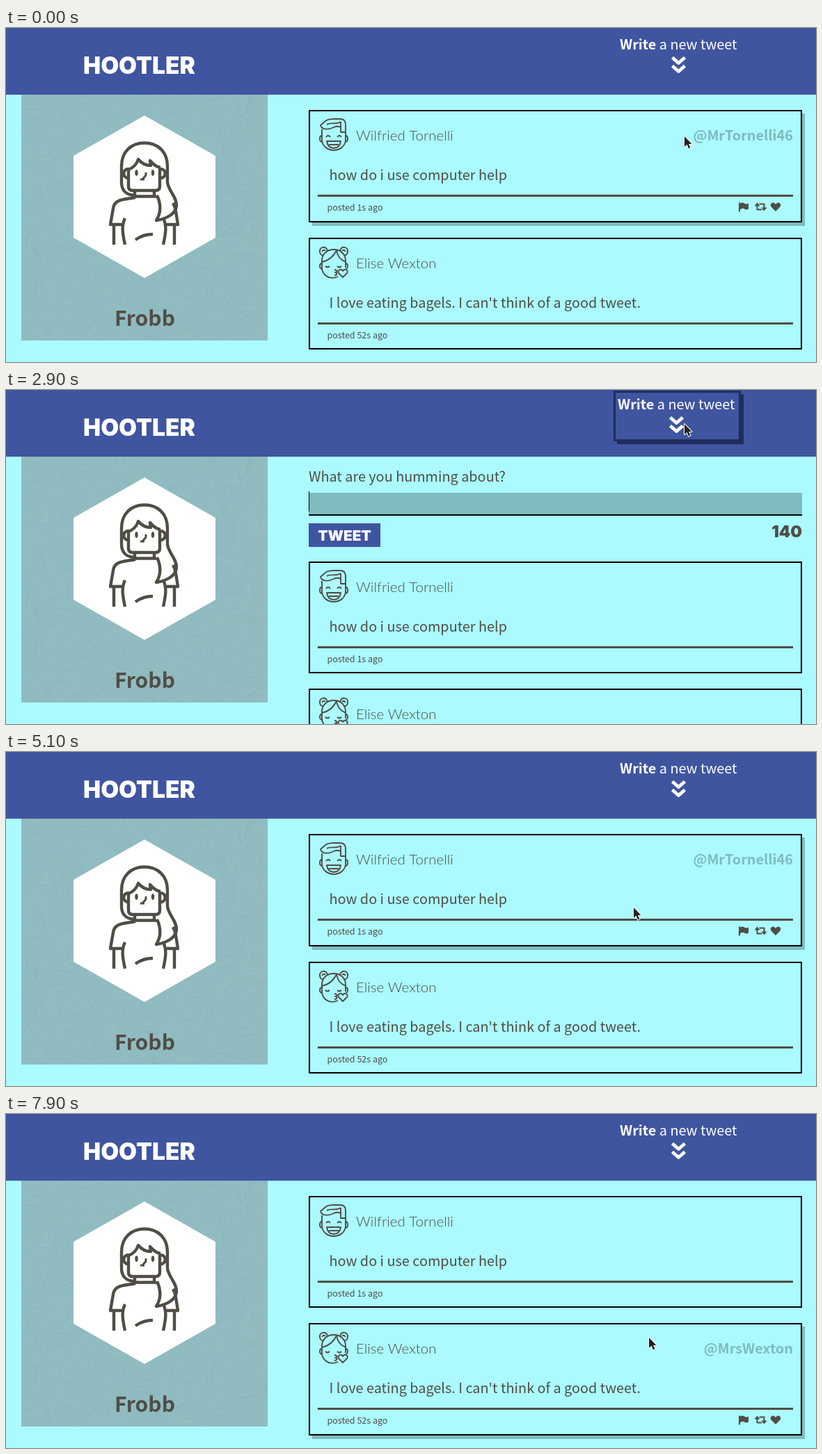
These frames come from a looping animation (1164x481 px, 8 s). An HTML page with a canvas:

```html
<!DOCTYPE html>
<html lang="en">
<head>
<meta charset="utf-8">
<title>Hootler</title>
<style>
html, body { margin: 0; width: 100%; height: 100%; overflow: hidden; background: #aafaff; }
canvas { display: block; }
</style>
</head>
<body>
<canvas id="stage" width="1164" height="481"></canvas>
<script>
const ctx = document.getElementById('stage').getContext('2d');
const LOOP = 8000;
const SANS = '"Noto Sans CJK JP", "Noto Sans CJK SC", "Noto Sans CJK", "Noto Sans", sans-serif';
const LIGHT = 'Lato, "Open Sans", sans-serif';
const CHUNKY = 'Inter, Roboto, sans-serif';
const BODY = 19.85;
const C = { page: '#aafaff', header: '#4055a0', ink: '#504d45', teal: '#7fbbbf', dark: '#1f2d5c' };
const FORM_HEIGHT = 136;
const FORM_TOP = 96;

const posts = [
  { id: 'first', name: 'Wilfried Tornelli', handle: '@MrTornelli46', text: 'how do i use computer help', age: '1s' },
  { id: 'second', name: 'Elise Wexton', handle: '@MrsWexton', text: "I love eating bagels. I can't think of a good tweet.", age: '52s' }
];

// [time, x, y, glide from the previous key]
const cursorKeys = [
  [0, 975, 156], [500, 975, 156], [1400, 975, 49, true], [4500, 975, 51],
  [4700, 902, 225], [5100, 902, 224], [5200, 902, 225], [6100, 903, 250],
  [6500, 890, 364], [6800, 890, 364], [7400, 908, 190, true], [7600, 908, 190], [7900, 924, 322, true]
];
const hoverKeys = [
  [0, 'first'], [900, ''], [1200, 'write'], [4500, 'first'],
  [6100, 'second'], [7100, 'first'], [7800, 'second']
];

const swing = u => 0.5 - Math.cos(Math.PI * Math.min(1, Math.max(0, u))) / 2;

function rect(x, y, w, h, color) {
  ctx.fillStyle = color;
  ctx.fillRect(x, y, w, h);
}

function text(str, x, y, size, { weight = 400, color = C.ink, align = 'left', family = SANS } = {}) {
  ctx.font = `${weight} ${size}px ${family}`;
  ctx.fillStyle = color;
  ctx.textAlign = align;
  ctx.fillText(str, x, y);
  return ctx.measureText(str).width;
}

function outline(path, width, x = 0, y = 0, color = C.ink) {
  ctx.save();
  ctx.translate(x, y);
  ctx.strokeStyle = color;
  ctx.lineWidth = width;
  ctx.lineJoin = 'round';
  ctx.stroke(path);
  ctx.restore();
}

function solid(path, x, y, color = C.ink) {
  ctx.save();
  ctx.translate(x, y);
  ctx.fillStyle = color;
  ctx.fill(path);
  ctx.restore();
}

const shapes = {
  hexagon: new Path2D('M199 126 301 184V302L199 360 97 302V184Z'),
  woman: new Path2D(`M186 241C173 241 166 234 166 222V199C166 178 180 165.5 199 165.5S232 178 232 199V222
    C233 234 246 244 245 256C244 268 230 275 216 277C223 266 223 254 217 241
    M176 201V228Q176 234 182 234H215Q221 234 221 228V201
    M176 204C183 201 188 196 190 189C195 195 202 198 208 198L207 191C212 197 217 200 222 201
    M176 203C167 203 167 216 176 216M222 203C231 203 231 216 222 216
    M185 234V241M213 234V241M184 242.5H216M186 244C176 246 165 246 160 250Q155 253 154 260L150 283H166
    M171 274C166 284 167 294 171 312M155 283V312M240 252Q243 257 244 264L247 283H231
    M226 274C231 284 230 294 226 312M242 283V312M186 305C193 300 201 297 211 297`),
  womanEyes: new Path2D('M187.5 204C190.5 204 190.5 213 187.5 213S184.5 204 187.5 204ZM211 204C214 204 214 213 211 213S208 204 211 204Z'),
  womanNose: new Path2D('M201 208V212L196 218M193 218H199'),
  first: new Path2D(`M-17 -8V8C-16 17 -8 22 0 22S16 17 17 8V-15C17 -20 14 -23 9 -23H0
    C-12 -23 -12 -19 -19 -14C-17 -6 -6 -8 0 -11C4 -13 8 -12 10 -11V-4H17M10 -11V-19
    M-10 -15C-5 -19 3 -14 10 -19
    M-17 1C-21 1 -21 10 -17 10M17 1C21 1 21 10 17 10
    M-11 3Q-8 -1 -5 3M5 3Q8 -1 11 3M-10 9H10C9 16 5 19 0 19S-9 16 -10 9ZM-7 14H7`),
  second: new Path2D(`M-9 -17C-11 -25 -21 -23 -20 -16C-20 -12 -17 -10 -15 -11M9 -17C11 -25 21 -23 20 -16
    C20 -12 17 -10 15 -11M-17 -16Q-14 -20 -12 -17M17 -16Q14 -20 12 -17
    M6 20C-8 26 -17 16 -17 7V-3C-17 -13 -9 -19 0 -19S17 -13 17 -3V7
    M-17 -1C-8 -3 0 -9 4 -18C5 -10 10 -4 17 -1M-17 1C-21 1 -21 9 -17 9M17 1C21 1 21 9 17 9
    M-12 5Q-9 8 -6 5M5 5Q8 8 11 5M1 10C6 11 5 14 2 14C6 14 5 18 1 18
    M13 21L7 15C5 10 11 8 13 12C15 8 22 10 19 15Z`),
  flag: new Path2D('M-7 -6H-5V-5Q-2 -7 1 -5T7 -5V3Q4 5 1 3T-5 4V7H-7Z'),
  heart: new Path2D('M0 6.5 -6 .5C-9 -3 -6 -6.5 -3 -6Q-1 -5.5 0 -3.5Q1 -5.5 3 -6C6 -6.5 9 -3 6 .5Z'),
  repost: new Path2D('M-3 4H-5V-4M3 -4H5V4M-2 -4H5M2 4H-5'),
  repostTips: new Path2D('M-9 -1 -5 -6 -1 -1ZM9 1 5 6 1 1Z'),
  chevrons: new Path2D('M-9 -11 0 -3 9 -11M-9 1 0 9 9 1'),
  pointer: new Path2D('M0 0V15L3.5 11.8 6 17.5 8.5 16.4 6 11H10.5Z')
};

// Engraved backdrop: short, faint strokes that follow a smooth field.
const backdrop = (() => {
  const cv = document.createElement('canvas');
  cv.width = 354;
  cv.height = 354;
  const g = cv.getContext('2d');
  let seed = 7;
  const rnd = () => (seed = seed * 16807 % 2147483647) / 2147483647;
  g.fillStyle = '#90bbc0';
  g.fillRect(0, 0, 354, 354);
  g.lineWidth = 0.5;
  for (let i = 0; i < 3200; i++) {
    let x = rnd() * 354, y = rnd() * 354;
    g.strokeStyle = i % 2 ? 'rgba(180,214,216,.2)' : 'rgba(108,160,166,.18)';
    g.beginPath();
    g.moveTo(x, y);
    for (let k = 0; k < 6; k++) {
      const a = 0.7 + 1.5 * Math.sin(x / 27 + Math.sin(y / 21)) + 1.2 * Math.cos(y / 31 - x / 51);
      x += 3 * Math.cos(a);
      y += 3 * Math.sin(a);
      g.lineTo(x, y);
    }
    g.stroke();
  }
  return cv;
})();

function drawProfile() {
  ctx.drawImage(backdrop, 22, 95.5);
  solid(shapes.hexagon, 0, 0, '#fff');
  outline(shapes.woman, 4.4);
  solid(shapes.womanEyes, 0, 0);
  outline(shapes.womanNose, 3);
  text('Frobb', 199.5, 429, 30, { weight: 700, align: 'center' });
}

function drawCard(post, top, hovered) {
  const height = hovered ? 162 : 161;
  if (hovered) rect(440, top + 5, 708, height, C.teal);
  rect(435, top, 709, height, '#000');
  rect(437, top + 2, 705, height - 4, C.page);
  outline(shapes[post.id], 1.9, 471, top + 36);
  text(post.name, 503, top + 44, 20.5, { weight: 300, family: LIGHT });
  text(post.text, 464.5, top + 101, BODY);
  rect(448, top + 122, 683, 3, C.ink);
  text(`posted ${post.age} ago`, 461.5, top + 145, 12.5);
  if (hovered) {
    text(post.handle, 1131, top + 44, BODY, { weight: 700, color: C.teal, align: 'right' });
    const y = top + 139.5;
    solid(shapes.flag, 1060, y);
    outline(shapes.repost, 2, 1084.5, y);
    solid(shapes.repostTips, 1084.5, y);
    solid(shapes.heart, 1106, y);
  }
  return top + height + 22;
}

// The focused field keeps itself scrolled into view while the form opens.
function formState(t) {
  if (t < 2600 || t >= 4500) return { height: 0, shift: 0 };
  if (t < 3700) {
    const height = FORM_HEIGHT * swing((t - 2585) / 370);
    return { height, shift: -Math.min(72, Math.max(0, FORM_HEIGHT - 1 - height)) };
  }
  const left = 1 - swing((Math.min(t, 4100) - 3750) / 400);
  return { height: FORM_HEIGHT * left, shift: -17 * (1 - left) };
}

function drawForm(t, { height, shift }) {
  if (!height) return;
  ctx.save();
  ctx.beginPath();
  ctx.rect(430, FORM_TOP, 720, Math.round(height) + 1);
  ctx.clip();
  ctx.translate(0, Math.round(shift));
  text('What are you humming about?', 435, 138, BODY);
  if (t < 3600) rect(435, 154, 709, 31, C.teal);
  rect(435, 185, 709, 2, '#000');
  if (t < 3200) rect(435, 152, 1, 29, '#000');
  rect(435, 198, 103, 34, C.header);
  text('TWEET', 486.5, 222.5, 20.8, { weight: 900, color: '#fff', align: 'center', family: CHUNKY });
  text('140', 1144, 218, 23.5, { weight: 900, align: 'right', family: CHUNKY });
  ctx.restore();
}

function drawHeader(hovered) {
  rect(0, 0, 1164, 96, C.header);
  text('HOOTLER', 111, 66, 33.5, { weight: 900, color: '#fff', family: CHUNKY });
  ctx.save();
  if (hovered) {
    rect(878, 6, 182, 72, C.dark);
    rect(873, 1, 183, 73, C.dark);
    rect(876, 4, 177, 67, C.header);
    ctx.translate(-3, -3);
  }
  const bold = text('Write', 882, 31, BODY, { weight: 700, color: '#fff' });
  text(' a new tweet', 882 + bold, 31, BODY, { color: '#fff' });
  outline(shapes.chevrons, 4.8, 966.5, 53.5, '#fff');
  ctx.restore();
}

function cursorAt(t) {
  const i = cursorKeys.findLastIndex(k => k[0] <= t);
  const [t0, x, y] = cursorKeys[i];
  const next = cursorKeys[i + 1];
  if (!next || !next[3]) return [x, y];
  const u = (t - t0) / (next[0] - t0);
  return [x + (next[1] - x) * u, y + (next[2] - y) * u];
}

function drawCursor([x, y]) {
  outline(shapes.pointer, 2, x, y, '#fff');
  solid(shapes.pointer, x, y, '#222');
}

function draw(t) {
  const hover = hoverKeys.findLast(k => k[0] <= t)[1];
  const form = formState(t);
  rect(0, 0, 1164, 481, C.page);
  drawProfile();
  drawForm(t, form);
  let top = Math.round(118 + form.height);
  for (const post of posts) top = drawCard(post, top, hover === post.id);
  drawHeader(hover === 'write');
  drawCursor(cursorAt(t));
}

const start = performance.now();
function tick() {
  const t = (performance.now() - start) % LOOP;
  draw(Math.floor(t / 100) * 100);
  requestAnimationFrame(tick);
}
tick();
</script>
</body>
</html>
```
